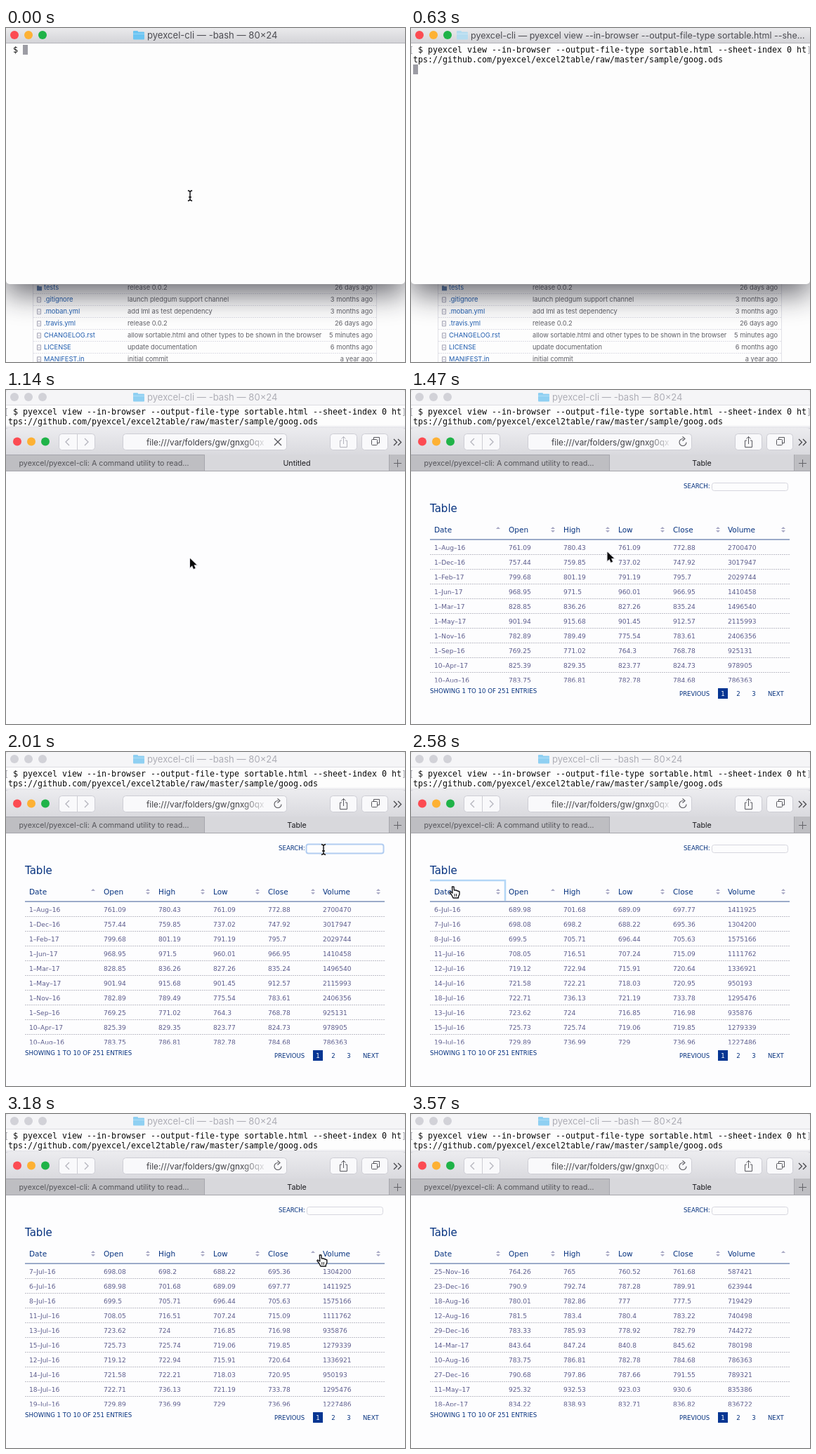
These frames come from a looping animation (568 by 476 pixels, 3.63 s). An HTML page with a canvas:

```html
<!DOCTYPE html>
<html lang="en">
<head>
<meta charset="utf-8">
<title>Sortable table from the command line</title>
<style>
  html, body { margin: 0; width: 100%; height: 100%; overflow: hidden; background: #fdfdfd; }
  canvas { display: block; }
</style>
</head>
<body>
<canvas id="stage" width="568" height="476"></canvas>
<script>
const ctx = document.getElementById('stage').getContext('2d');
const W = 568, H = 476, LOOP = 3630, STEP = 30;
const UI = 'Inter, sans-serif';
const MONO = '"DejaVu Sans Mono", monospace';
const PAGE = '"DejaVu Sans", sans-serif';
const NAVY = '#06327f', INK = '#0a0a0a', EDGE = '#cdcdd4';
const LIGHTS = ['#fc4b52', '#fdb134', '#1fb348'];

const TYPE_FROM = 60, TYPE_TO = 420, PASTE = 480, ENTER = 570;
const DONE = 1050, BROWSER = 1080, LOADED = 1260;

const COMMAND = 'pyexcel view --in-browser --output-file-type sortable.html --sheet-index 0 ';
const ADDRESS = 'https://github.com/pyexcel/excel2table/raw/master/sample/goog.ods';

const FILES = [
  ['tests', 'release 0.0.2', '26 days ago'],
  ['.gitignore', 'launch pledgum support channel', '3 months ago'],
  ['.moban.yml', 'add lml as test dependency', '3 months ago'],
  ['.travis.yml', 'release 0.0.2', '26 days ago'],
  ['CHANGELOG.rst', 'allow sortable.html and other types to be shown in the browser', '5 minutes ago'],
  ['LICENSE', 'update documentation', '6 months ago'],
  ['MANIFEST.in', 'initial commit', 'a year ago']
];

const rows = text => text.trim().split('\n').map(line => line.trim().split(' '));

const byDate = rows(`
  1-Aug-16 761.09 780.43 761.09 772.88 2700470
  1-Dec-16 757.44 759.85 737.02 747.92 3017947
  1-Feb-17 799.68 801.19 791.19 795.7 2029744
  1-Jun-17 968.95 971.5 960.01 966.95 1410458
  1-Mar-17 828.85 836.26 827.26 835.24 1496540
  1-May-17 901.94 915.68 901.45 912.57 2115993
  1-Nov-16 782.89 789.49 775.54 783.61 2406356
  1-Sep-16 769.25 771.02 764.3 768.78 925131
  10-Apr-17 825.39 829.35 823.77 824.73 978905
  10-Aug-16 783.75 786.81 782.78 784.68 786363`);

const cheapest = rows(`
  6-Jul-16 689.98 701.68 689.09 697.77 1411925
  7-Jul-16 698.08 698.2 688.22 695.36 1304200
  8-Jul-16 699.5 705.71 696.44 705.63 1575166
  11-Jul-16 708.05 716.51 707.24 715.09 1111762
  12-Jul-16 719.12 722.94 715.91 720.64 1336921
  14-Jul-16 721.58 722.21 718.03 720.95 950193
  18-Jul-16 722.71 736.13 721.19 733.78 1295476
  13-Jul-16 723.62 724 716.85 716.98 935876
  15-Jul-16 725.73 725.74 719.06 719.85 1279339
  19-Jul-16 729.89 736.99 729 736.96 1227486`);

const byVolume = rows(`
  25-Nov-16 764.26 765 760.52 761.68 587421
  23-Dec-16 790.9 792.74 787.28 789.91 623944
  18-Aug-16 780.01 782.86 777 777.5 719429
  12-Aug-16 781.5 783.4 780.4 783.22 740498
  29-Dec-16 783.33 785.93 778.92 782.79 744272
  14-Mar-17 843.64 847.24 840.8 845.62 780198
  10-Aug-16 783.75 786.81 782.78 784.68 786363
  27-Dec-16 790.68 797.86 787.66 791.55 789321
  11-May-17 925.32 932.53 923.03 930.6 835386
  18-Apr-17 834.22 838.93 832.71 836.82 836722`);

const COLUMNS = [
  ['Date', 33, 124], ['Open', 139, 202], ['High', 217, 280],
  ['Low', 295, 358], ['Close', 373, 437], ['Volume', 451, 530]
];

// Time of each header click and the column it sorts.
const SORTS = [[0, 0], [2400, 1], [2610, 0], [2790, 2], [2940, 3], [3090, 4], [3240, 5]];

// Pointer path: time, x, y of the hot spot.
const PATH = [
  [1080, 262, 240], [1380, 262, 240], [1860, 452, 139], [2070, 452, 139],
  [2340, 152, 198], [2430, 152, 198], [2550, 60, 192], [2610, 60, 192],
  [2760, 228, 200], [2800, 228, 200], [2880, 299, 201], [2950, 300, 201],
  [3060, 382, 201], [3110, 382, 201], [3210, 466, 201], [3270, 466, 201], [3450, 566, 300]
];

function text(str, x, y, size, color, family = UI, align = 'left') {
  ctx.font = `${size}px ${family}`;
  ctx.textAlign = align;
  ctx.fillStyle = color;
  ctx.fillText(str, x, y);
}

function rect(x, y, w, h, color) {
  ctx.fillStyle = color;
  ctx.fillRect(x, y, w, h);
}

function box(x, y, w, h, r, fill, stroke, width = 1) {
  ctx.beginPath();
  ctx.roundRect(x, y, w, h, r);
  if (fill) { ctx.fillStyle = fill; ctx.fill(); }
  if (stroke) { ctx.strokeStyle = stroke; ctx.lineWidth = width; ctx.stroke(); }
}

function path(points, color, width = 1, fill) {
  ctx.beginPath();
  points.forEach(([x, y]) => ctx.lineTo(x, y));
  if (fill) { ctx.closePath(); ctx.fillStyle = fill; ctx.fill(); }
  if (color) { ctx.strokeStyle = color; ctx.lineWidth = width; ctx.stroke(); }
}

function vertical(y0, y1, from, to) {
  const g = ctx.createLinearGradient(0, y0, 0, y1);
  g.addColorStop(0, from);
  g.addColorStop(1, to);
  return g;
}

function lights(x, y, colors) {
  colors.forEach((color, i) => {
    ctx.beginPath();
    ctx.arc(x + 20 * i, y, 6, 0, Math.PI * 2);
    ctx.fillStyle = color;
    ctx.fill();
  });
}

function dotted(x0, x1, y, color) {
  ctx.setLineDash([2, 1]);
  path([[x0, y], [x1, y]], color);
  ctx.setLineDash([]);
}

function drawRepository() {
  rect(0, 0, W, H, '#fdfdfd');
  path([[38.5, 360], [38.5, H]], '#e2e2e8');
  path([[527.5, 360], [527.5, H]], '#e2e2e8');
  FILES.forEach(([name, message, age], i) => {
    const y = 373.3 + 17 * i;
    if (i) {
      dotted(39, 527, y - 11.8, '#dedee6');
      box(44.5, y - 6.5, 5, 7, 0, '#f6f6fa', '#a4a4b4');
      path([[46, y - 2.5], [48, y - 2.5]], '#a4a4b4');
    } else {
      rect(44, y - 6, 3, 2, '#5a7ba8');
      rect(44, y - 5, 7, 6, '#5a7ba8');
    }
    text(name, 54, y, 9.3, '#1f5cae');
    text(message, 173, y, 9.3, '#616168');
    text(age, 522, y, 9.3, '#616168', UI, 'right');
  });
}

function folder(x, color) {
  box(x, 4, 7, 4, 1, color);
  box(x, 5.5, 16, 11, 1, color);
  rect(x, 8, 16, 0.7, 'rgba(255,255,255,.45)');
}

function drawTerminal(t) {
  const active = t < BROWSER, running = t >= ENTER && t < DONE;
  ctx.save();
  ctx.shadowColor = 'rgba(20,20,30,.65)';
  ctx.shadowBlur = 42;
  ctx.shadowOffsetY = 14;
  box(0, 0, W, 365, 5, '#fdfdfd');
  ctx.restore();
  box(0, 0, W, 22, [5, 5, 0, 0], active ? vertical(0, 22, '#eaeaec', '#d3d3d7') : '#f5f5f7');
  rect(0, 21, W, 1, active ? '#b4b4ba' : '#dcdce2');
  lights(12, 10, active ? LIGHTS : Array(3).fill('#d2d2d8'));

  const ink = active ? '#4c4c52' : '#aeaeb6';
  if (running) {
    folder(65, '#b5dcf0');
    text('pyexcel-cli — pyexcel view --in-browser --output-file-type sortable.html --she…', 85, 15, 12.5, ink);
  } else {
    folder(181, active ? '#6cc5f2' : '#8fd0f2');
    text('pyexcel-cli — -bash — 80×24', 201, 15, 13.1, ink);
  }

  const share = Math.min(1, Math.max(0, (t - TYPE_FROM) / (TYPE_TO - TYPE_FROM)));
  const typed = ' $ ' + COMMAND.slice(0, Math.round(share * COMMAND.length)) + (t >= PASTE ? ADDRESS : '');
  const lines = [typed.slice(0, 80), typed.slice(80)];
  lines.forEach((line, i) => text(line, 3, 35 + 14 * i, 11.63, INK, MONO));

  let row = lines[1] ? 1 : 0, column = lines[row].length;
  if (t >= ENTER) {
    row = 2;
    column = running ? 0 : 3;
    text('[', -3, 35, 11.63, '#a2a2aa', MONO);
    text(']', 563, 35, 11.63, '#a2a2aa', MONO);
    if (!running) text(' $', 3, 63, 11.63, INK, MONO);
  }
  if (active) rect(3 + 7 * column, 24 + 14 * row, 7, 14, '#9c9ca4');
}

function button(x, w) {
  box(x + .5, 62.5, w, 23, 4, '#f9f9fb', EDGE);
}

function drawToolbar(loaded) {
  rect(0, 50, W, 6, vertical(50, 56, 'rgba(150,150,170,0)', 'rgba(150,150,170,.4)'));
  box(0, 54, W, 50, [5, 5, 0, 0], vertical(54, 93, '#ececef', '#d9d9de'));
  lights(16, 73.5, LIGHTS);

  button(75, 51);
  path([[101.5, 63], [101.5, 85]], EDGE);
  path([[90, 69], [85, 74], [90, 79]], '#b4b4bc', 1.3);
  path([[112, 69], [117, 74], [112, 79]], '#b4b4bc', 1.3);

  button(166, 233);
  const fade = ctx.createLinearGradient(335, 0, 369, 0);
  fade.addColorStop(0, '#3f3f44');
  fade.addColorStop(1, 'rgba(63,63,68,.1)');
  text('file:///var/folders/gw/gnxg0qx', 200, 78.5, 11.8, fade);
  if (loaded) {
    ctx.beginPath();
    ctx.arc(387, 74.5, 5, 0, 4.8);
    ctx.strokeStyle = '#55555b';
    ctx.lineWidth = 1.1;
    ctx.stroke();
    path([[386.5, 66.5], [390, 69.5], [386.5, 72.5]], '#55555b', 1.1);
  } else {
    path([[382, 69], [392, 79]], '#55555b', 1.2);
    path([[392, 69], [382, 79]], '#55555b', 1.2);
  }

  const icon = loaded ? '#58585e' : '#b4b4bc';
  button(461, 38);
  path([[478, 72], [475.5, 72], [475.5, 81.5], [485.5, 81.5], [485.5, 72], [483, 72]], icon);
  path([[480.5, 77], [480.5, 66.5]], icon);
  path([[477.5, 69.5], [480.5, 66.5], [483.5, 69.5]], icon);
  button(506, 37);
  box(520.5, 70.5, 8, 8, 1, null, '#58585e');
  path([[523.5, 70], [523.5, 67.5], [531.5, 67.5], [531.5, 75.5], [529, 75.5]], '#58585e');
  [552, 558].forEach(x => path([[x, 70], [x + 4.5, 74.5], [x, 79]], '#454549', 1.3));

  rect(0, 92, W, 24, '#bebec2');
  rect(283, 92, 262, 24, '#d8d8dc');
  rect(0, 92, 283, 1, '#a6a6ac');
  rect(282, 92, 1, 24, '#a6a6ac');
  rect(545, 92, 1, 24, '#a6a6ac');
  rect(0, 115, W, 1, '#a6a6ac');
  text('pyexcel/pyexcel-cli: A command utility to read…', 139.5, 108, 10.7, '#55555a', UI, 'center');
  text(loaded ? 'Table' : 'Untitled', 414, 108, 10.7, '#1c1c20', UI, 'center');
  path([[552, 104.5], [563, 104.5]], '#646469');
  path([[557.5, 99], [557.5, 110]], '#646469');
}

function sortMark(x, sorted) {
  const color = '#a8a8c4';
  path([[x - 3, 198], [x, 195], [x + 3, 198]], null, 1, color);
  if (!sorted) path([[x - 3, 200], [x, 203], [x + 3, 200]], null, 1, color);
}

function sortedRows(column) {
  if (column === 0) return byDate;
  if (column === 5) return byVolume;
  return [...cheapest].sort((a, b) => a[column] - b[column]);
}

function drawTable(t) {
  const column = SORTS.filter(([start]) => t >= start).pop()[1];
  const searching = t >= 1890 && t < 2340;
  text('SEARCH:', 388, 140, 8.6, NAVY, PAGE);
  if (searching) box(427.5, 131.5, 110, 13, 3, '#fdfdfe', '#b2cdf1', 2);
  else box(428.5, 132.5, 108, 11, 3, '#fdfdfe', '#d6d6de');

  text('Table', 27, 174, 15, NAVY, PAGE);
  COLUMNS.forEach(([label, x, mark], i) => {
    text(label, x, 203, 10.5, NAVY, PAGE);
    sortMark(mark, i === column);
  });
  rect(27, 212.5, 512, 1.2, '#5c76a8');
  if (t >= 2550 && t < 2640) path([[27, 183], [134, 183], [134, 212]], '#b3d6f6', 2.5);

  ctx.save();
  ctx.beginPath();
  ctx.rect(0, 214, W, 202.5);
  ctx.clip();
  sortedRows(column).forEach((row, i) => {
    const y = 228 + 20.95 * i;
    row.forEach((value, c) =>
      text(value.replaceAll('-', '–'), COLUMNS[c][1], y, 9.1, '#5c5c8c', PAGE));
    dotted(27, 539, Math.round(y + 6) + .5, '#bebec8');
  });
  ctx.restore();

  text('SHOWING 1 TO 10 OF 251 ENTRIES', 27, 432, 8.6, NAVY, PAGE);
  text('PREVIOUS', 382, 435.5, 8.5, NAVY, PAGE);
  rect(437, 425, 14, 15, '#053592');
  ['1', '2', '3'].forEach((n, i) =>
    text(n, 444 + 22 * i, 435.5, 8.6, i ? NAVY : '#fff', PAGE, 'center'));
  text('NEXT', 508, 435.5, 8.5, NAVY, PAGE);
}

function ibeam(x, y) {
  const strokes = [
    [[x - 3, y - 7.5], [x, y - 6], [x + 3, y - 7.5]],
    [[x, y - 6], [x, y + 6]],
    [[x - 3, y + 7.5], [x, y + 6], [x + 3, y + 7.5]],
    [[x - 2, y + 2], [x + 2, y + 2]]
  ];
  strokes.forEach(s => path(s, '#ececf2', 3));
  strokes.forEach(s => path(s, '#111', 1.4));
}

function arrow(x, y) {
  const shape = [[0, 0], [0, 13], [3, 10.2], [5, 15], [7.5, 14], [5.5, 9.3], [9.5, 9.3]];
  path([...shape, shape[0]].map(([dx, dy]) => [x + dx, y + dy]), '#e4e4ea', 2);
  path(shape.map(([dx, dy]) => [x + dx, y + dy]), null, 1, INK);
}

function hand(x, y) {
  const shape = [
    [-1.5, 0], [1, 0], [1.5, 5], [4, 5], [6.5, 6], [9, 7], [9, 11], [7.5, 14],
    [7.5, 16], [0, 16], [-2, 12], [-5, 8], [-4, 7], [-1, 9]
  ];
  ctx.lineJoin = 'round';
  path([...shape, shape[0]].map(([dx, dy]) => [x + dx, y + dy]), '#151518', 1.4, '#fff');
  [2, 4.5].forEach(dx => path([[x + dx, y + 10], [x + dx, y + 14]], '#151518'));
  ctx.lineJoin = 'miter';
}

function drawPointer(t) {
  if (t < TYPE_FROM) return ibeam(262, 239);
  if (t < BROWSER || t >= 3450) return;
  const next = PATH.findIndex(([time]) => time > t);
  const [t0, x0, y0] = PATH[next - 1], [t1, x1, y1] = PATH[next];
  const p = (t - t0) / (t1 - t0), ease = p * p * (3 - 2 * p);
  const x = x0 + (x1 - x0) * ease, y = y0 + (y1 - y0) * ease;
  if (y > 182 && y < 213 && x < 539) hand(x, y);
  else if (y > 131 && y < 145 && x > 427 && x < 538) ibeam(x, y);
  else arrow(x, y);
}

function draw(t) {
  drawRepository();
  drawTerminal(t);
  if (t >= BROWSER) {
    drawToolbar(t >= LOADED);
    rect(0, 116, W, H - 116, '#fdfdfe');
    if (t >= LOADED) drawTable(t);
  }
  drawPointer(t);
}

const start = performance.now();
function tick() {
  const t = (performance.now() - start) % LOOP;
  draw(Math.floor(t / STEP) * STEP);
  requestAnimationFrame(tick);
}
tick();
</script>
</body>
</html>
```
